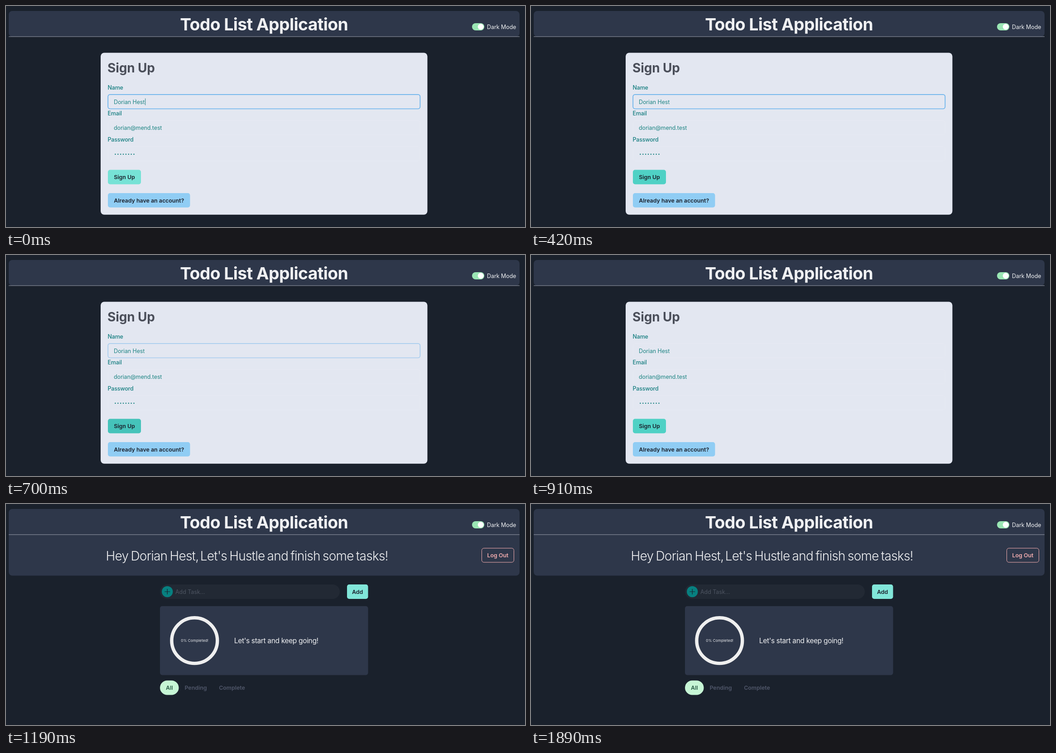
Recreate the animation shown at these times as an HTML page. Size 1146 by 489 pixels, loop 2.03 s.

```html
<!DOCTYPE html>
<html lang="en">
<head>
<meta charset="utf-8">
<title>Todo List Application</title>
<style>
  html, body { margin: 0; width: 100%; height: 100%; overflow: hidden; background: #1a212c; }
  svg { display: block; width: 1146px; height: 489px; }
  text { font: 400 12.4px Inter, "Open Sans", sans-serif; font-optical-sizing: none; fill: #f0f1f3; }
  .title { font-weight: 700; font-size: 37.3px; letter-spacing: -.016em; text-anchor: middle; }
  .heading { font-weight: 700; font-size: 27.9px; letter-spacing: -.003em; fill: #4b4f5a; }
  .label { font-weight: 500; letter-spacing: -.01em; fill: #147d7f; }
  .value { fill: #1f8584; letter-spacing: -.005em; }
  .button { font-weight: 600; fill: #1a202c; text-anchor: middle; }
  .greeting { font-weight: 300; font-size: 28px; letter-spacing: -.027em; word-spacing: -.07em; }
  .cheer { font-size: 15.5px; letter-spacing: -.022em; }
  .percent { font-size: 8px; letter-spacing: .02em; text-anchor: middle; }
  .tab { font-weight: 600; fill: #50576a; text-anchor: middle; }
  .panel { fill: #2e374a; }
  .field { fill: none; stroke: #e7eaf3; }
</style>
</head>
<body>
<svg viewBox="0 0 1146 489">
  <rect id="header" class="panel" x="6" y="11" width="1128" height="57" rx="8"/>
  <path d="M6 67.8H1134" stroke="#9a9eab"/>
  <text class="title" x="569.7" y="53.7">Todo List Application</text>
  <rect x="1029" y="38" width="27.2" height="16" rx="8" fill="#9ae6b4"/>
  <circle cx="1048.2" cy="46" r="6.4" fill="#fff"/>
  <text x="1062" y="50.5">Dark Mode</text>

  <g id="signup">
    <rect x="209" y="103.5" width="721.5" height="358.3" rx="8" fill="#e3e7f1"/>
    <text class="heading" x="224" y="147">Sign Up</text>
    <text class="label" x="224.5" y="184.5">Name</text>
    <text class="label" x="224.5" y="242.3">Email</text>
    <text class="label" x="224.5" y="300">Password</text>
    <rect class="field" x="225.5" y="196" width="689" height="31.5" rx="4.8"/>
    <rect class="field" x="225.5" y="253.7" width="689" height="31.5" rx="4.8"/>
    <rect class="field" x="225.5" y="311.4" width="689" height="31.5" rx="4.8"/>
    <rect id="focus" x="225.2" y="195.8" width="689.2" height="31.7" rx="4.8"
          fill="none" stroke="#69b2ec" stroke-width="1.7"/>
    <text class="value" x="238" y="216.5">Dorian Hest</text>
    <path id="caret" d="M307.7 204.5V219.5" stroke="#1f7f80"/>
    <text class="value" x="238" y="274.2">dorian@mend.test</text>
    <g id="dots" fill="#1f8584"></g>
    <rect id="submit" x="225" y="362.5" width="73" height="32" rx="4.8"/>
    <text class="button" x="261.5" y="383.3">Sign Up</text>
    <rect x="225" y="414" width="181.4" height="31.7" rx="4.8" fill="#90cdf4"/>
    <text class="button" x="315.7" y="434.5">Already have an account?</text>
  </g>

  <g id="tasks">
    <text class="greeting" x="220.6" y="124.6">Hey Dorian Hest,</text>
    <text class="greeting" x="428.8" y="124.6">Let's Hustle and finish some tasks!</text>
    <rect x="1050.5" y="97.8" width="71" height="31.2" rx="4.8" fill="none" stroke="#f5aeb0"/>
    <text class="button" x="1086" y="118.2" style="fill:#f5aeb0">Log Out</text>

    <rect x="340" y="178" width="397" height="32" rx="16" fill="#222934"/>
    <circle cx="356.2" cy="194" r="12.2" fill="#078080"/>
    <path d="M350.2 194H362.2M356.2 188V200" stroke="#1a202c" stroke-width="1.2"/>
    <text x="374" y="198.8" style="fill:#4e5562">Add Task...</text>
    <rect x="753" y="178" width="46.5" height="32" rx="4.8" fill="#81e6d9"/>
    <text class="button" x="776.2" y="198.6">Add</text>

    <rect class="panel" x="340" y="226" width="459.5" height="152.4" rx="4.8"/>
    <circle cx="416.3" cy="302.2" r="50.4" fill="none" stroke="#efefef" stroke-width="7.4"/>
    <text class="percent" x="416.6" y="305">0% Completed!</text>
    <text class="cheer" x="503.8" y="308.3">Let's start and keep going!</text>

    <rect x="340" y="390.5" width="41.5" height="32" rx="16" fill="#c6f6d5"/>
    <text class="tab" x="360.8" y="411.3" style="fill:#285b45">All</text>
    <text class="tab" x="419" y="411.3">Pending</text>
    <text class="tab" x="499" y="411.3">Complete</text>
  </g>
</svg>
<script>
  const LOOP = 2030;
  const TASKS_AT = 1120;
  const CARET_OFF = 70;

  // [start in ms, value], each held until the next row
  const submitFill = [
    [0, '#76e2d6'], [70, '#61d9cd'], [140, '#54d3c7'], [210, '#4fd1c5'],
    [630, '#4dcec2'], [700, '#45c3ba'], [770, '#40bcb5'], [840, '#48c7bd'], [910, '#4fd1c5']
  ];
  const focusAlpha = [[0, 1], [630, .94], [700, .5], [770, .15], [840, .03], [910, 0]];

  const el = id => document.getElementById(id);
  const held = (steps, t) => steps.filter(([start]) => start <= t).pop()[1];
  const show = (id, on) => el(id).setAttribute('visibility', on ? 'visible' : 'hidden');

  for (let i = 0; i < 8; i++) {
    const dot = document.createElementNS(el('dots').namespaceURI, 'circle');
    dot.setAttribute('cx', 241.4 + i * 5.87);
    dot.setAttribute('cy', 328);
    dot.setAttribute('r', 1.35);
    el('dots').append(dot);
  }

  function draw(t) {
    const tasks = t >= TASKS_AT;
    show('signup', !tasks);
    show('tasks', tasks);
    show('caret', !tasks && t < CARET_OFF);
    el('header').setAttribute('height', tasks ? 147.6 : 57);
    el('submit').setAttribute('fill', held(submitFill, t));
    el('focus').setAttribute('opacity', held(focusAlpha, t));
  }

  const begin = performance.now();
  function tick() {
    draw((performance.now() - begin) % LOOP);
    requestAnimationFrame(tick);
  }
  draw(0);
  requestAnimationFrame(tick);
</script>
</body>
</html>
```
